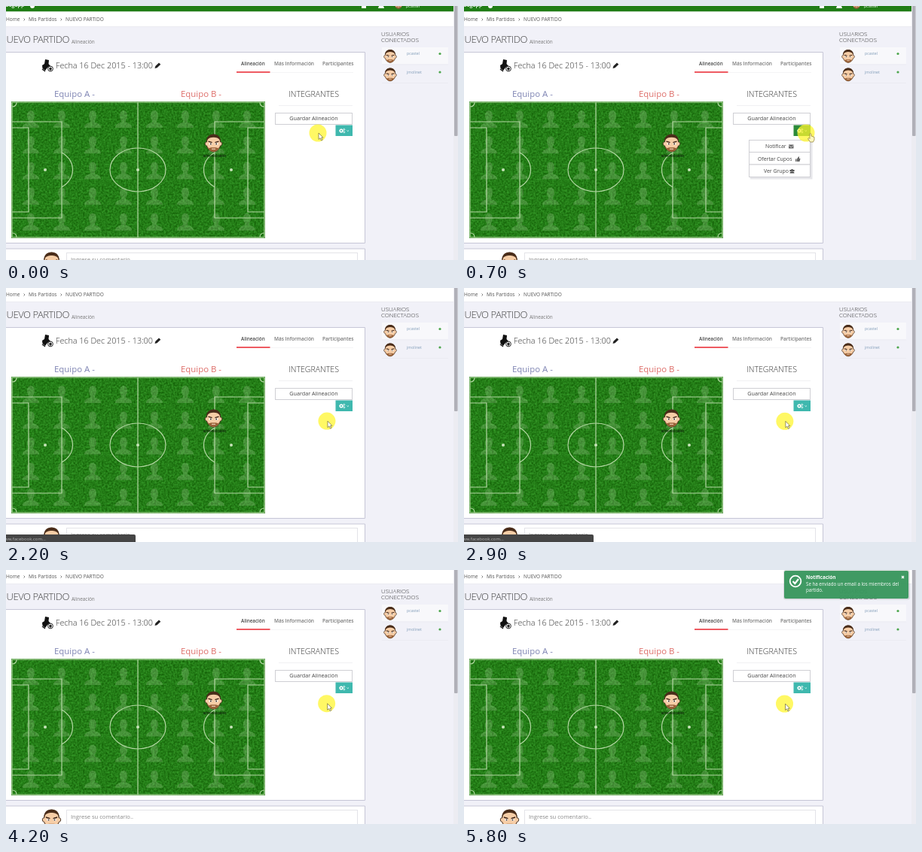
Recreate the animation shown at these times as an HTML page. Size 600 px wide and 338 px high, loop 5.9 s.

```html
<!DOCTYPE html>
<html lang="es">
<head>
<meta charset="utf-8">
<style>
  html, body { margin: 0; width: 100%; height: 100%; overflow: hidden; background: #f1f1f8; }
  svg { display: block; width: 600px; height: 338px; font-family: "Open Sans", sans-serif; }
  .light { font-weight: 300; }
  .semi { font-weight: 600; }
  .mid { text-anchor: middle; }
  .box { fill: #fff; stroke: #cfcfd4; }
  .lines { fill: none; stroke: #b4d8a4; stroke-width: 1.2; }
</style>
</head>
<body>
<svg viewBox="0 0 600 338">
  <defs>
    <filter id="grass" x="0" y="0" width="1" height="1" color-interpolation-filters="sRGB">
      <feTurbulence type="fractalNoise" baseFrequency=".4" numOctaves="2" seed="4"/>
      <feColorMatrix values=".2 0 0 0 .04  .34 0 0 0 .32  .2 0 0 0 -.01  0 0 0 0 1"/>
    </filter>
    <g id="face">
      <path d="M-9-1C-12-2-12 4-9 4C-8 9-3 12 0 12S8 9 9 4C12 4 12-2 9-1C9-14-9-14-9-1Z" fill="#f6cda6" stroke="#3a2518" stroke-width=".9"/>
      <path d="M-9 2C-8 9-3 12 0 12S8 9 9 2C8 7 6 8 3.500 6.300H-3.500C-6 8-8 7-9 2Z" fill="#9a6238"/>
      <path d="M-9.300-1C-11-15 11-15 9.300-1L8-4C6-8.500-6-8.500-8-4Z" fill="#4a2d1a"/>
      <path d="M-7-1.800L-2-.3M7-1.800L2-.3" stroke="#3a2014" stroke-width="1.400"/>
      <ellipse cx="-4" cy="1.500" rx="2" ry="1.300" fill="#fff"/>
      <ellipse cx="4" cy="1.500" rx="2" ry="1.300" fill="#fff"/>
      <circle cx="-3.700" cy="1.500" r=".9" fill="#2a1a10"/><circle cx="3.700" cy="1.500" r=".9" fill="#2a1a10"/>
      <path d="M-2.500 8.300H2.500" stroke="#f0d0b8" stroke-width="1.200"/>
    </g>
    <path id="fan" d="M-11 12C-11 7-7 6.500-3 4.500V2C-6-1-6-11 0-11S6-1 3 2V4.500C7 6.500 11 7 11 12Z"/>
    <g id="half" class="lines">
      <path d="M8 154H74V282H8M8 162H30V274H8M74 195A37 29 0 0 1 74 241M8 134Q14 134 14 128M8 302Q14 302 14 308"/>
      <circle cx="52" cy="218" r="1.500" fill="#d5ebcb"/>
    </g>
    <g id="gear" fill="none" stroke="#fff">
      <circle r="1.700" stroke-width="1.300"/>
      <circle r="2.500" stroke-width=".9" stroke-dasharray="1 .960"/>
    </g>
  </defs>

  <g id="page">
    <rect y="-10" width="600" height="370" fill="#f1f1f8"/>
    <rect y="-10" width="594" height="17.500" fill="#207d16"/>
    <g fill="#fff">
      <text x="-3" y="1" font-size="7" class="semi">Juegapp</text>
      <circle cx="35" r="3"/>
      <rect x="472" y="-2" width="6" height="5"/>
      <path d="M494 3L496-3H500L502 3Z"/>
      <text x="531" y="1.500" font-size="5.500">pcastel</text>
    </g>
    <use href="#face" transform="translate(521 -3) scale(.55)"/>

    <rect y="7.500" width="594" height="19.500" fill="#fff"/>
    <path d="M0 27.500H594" stroke="#ebebf1"/>
    <g font-size="6.500" fill="#555">
      <text y="20.300">Home</text><text x="30" y="20.300">Mis Partidos</text><text x="79" y="20.300">NUEVO PARTIDO</text>
      <path d="M23.500 16.500L25 18L23.500 19.500M72.500 16.500L74 18L72.500 19.500" fill="none" stroke="#666" stroke-width=".8"/>
    </g>
    <text x="84" y="49.300" font-size="13" letter-spacing="-.45" text-anchor="end" class="light" fill="#444">NUEVO PARTIDO</text>
    <text x="87" y="50" font-size="6.400" fill="#777">Alineación</text>

    <path d="M-2 61.500H476.500V315.500H-2Z" fill="#fff" stroke="#c6c6d6"/>
    <g transform="translate(47 71)">
      <path d="M5 0L10 1L9.500 6L12 9L8 11L5 15L1.500 12L1 8L4 6Z" fill="#111"/>
      <path d="M1 13L5 16" stroke="#111" stroke-width="1.200"/>
      <circle cx="12" cy="12.500" r="3.400" fill="#fff" stroke="#222"/>
      <path d="M12 10.500L14 12L13 14.500H11L10 12Z" fill="#222"/>
    </g>
    <text x="66" y="83" font-size="10.800" class="light" fill="#333">Fecha 16 Dec 2015 - 13:00</text>
    <path d="M197.500 83L198.300 80L203 75.500L205.300 77.800L200.500 82.300Z" fill="#222"/>
    <g font-size="6.500" class="semi" fill="#777">
      <text x="312" y="79" font-size="6.300" fill="#444">Alineación</text>
      <text x="356" y="79">Más Información</text><text x="420" y="79">Participantes</text>
    </g>
    <path d="M306 88H350.500" stroke="#ee5b62" stroke-width="2"/>
    <path d="M351 88.500H461" stroke="#f4f4f6"/>
    <text x="64" y="121" font-size="11.400" fill="#7d83b2">Equipo A -</text>
    <text x="232" y="121" font-size="11.400" fill="#dd6d68">Equipo B -</text>

    <rect x="7" y="127" width="337" height="182" fill="#23801f" filter="url(#grass)"/>
    <g id="crowd" fill="#d8f0c8" opacity=".2"></g>
    <g class="lines">
      <rect x="8" y="128" width="335" height="180"/>
      <path d="M175 128V308"/>
      <ellipse cx="175" cy="218" rx="37" ry="29"/>
      <circle cx="175" cy="218" r="1.500" fill="#d5ebcb"/>
    </g>
    <use href="#half"/>
    <use href="#half" transform="translate(351) scale(-1 1)"/>
    <use href="#face" transform="translate(275.500 182)"/>
    <text x="277" y="201.300" font-size="4.500" class="mid semi" fill="#10200c">administrador</text>

    <text x="408.500" y="121" font-size="10.600" class="light mid" fill="#333">INTEGRANTES</text>
    <path d="M362 132.500H460" stroke="#f0f0f3"/>
    <rect x="357.500" y="142.500" width="102" height="15" class="box"/>
    <text x="408.500" y="152.300" font-size="7.200" class="mid" fill="#444">Guardar Alineación</text>
    <rect id="button" x="437.500" y="158.500" width="22.500" height="14.500"/>
    <use href="#gear" x="445" y="166"/>
    <use href="#gear" transform="translate(448.800 164.300) scale(.5)"/>
    <use href="#gear" transform="translate(448.800 167.800) scale(.5)"/>
    <path d="M452.500 165.500L453.700 166.700L455 165.500" fill="none" stroke="#fff" stroke-width=".8"/>

    <g id="menu" font-size="6.900" fill="#444">
      <rect x="380" y="180" width="82.500" height="50.500" fill="#e6e6ea"/>
      <g class="box">
        <rect id="notify" x="378.500" y="178.500" width="81" height="16"/>
        <rect x="378.500" y="194.500" width="81" height="16.500"/>
        <rect x="378.500" y="211" width="81" height="16.500"/>
      </g>
      <text x="400" y="189">Notificar</text><text x="390" y="205.500">Ofertar Cupos</text><text x="398" y="222.300">Ver Grupo</text>
      <g fill="#666">
        <rect x="431" y="184.500" width="6.500" height="5"/>
        <path d="M431 185.500L434.200 188L437.500 185.500" fill="none" stroke="#fff" stroke-width=".7"/>
        <path d="M440 203.500H441.500V207H440ZM442 203.500L444 200.500H445V203H446.500L445.500 207H442Z"/>
      </g>
      <path d="M432.500 222.500Q432.500 220.300 435.500 220.300T438.500 222.500ZM432.500 220V218H434V220ZM437 220V218H438.500V220Z"/>
      <circle cx="435.500" cy="218.500" r="1.500"/>
    </g>

    <g class="light" font-size="7.900" fill="#333">
      <text x="498" y="39.500">USUARIOS</text><text x="498" y="47.700">CONECTADOS</text>
    </g>
    <rect x="499" y="55" width="88" height="22.500" fill="#f8f8fb"/>
    <path d="M499 78H587M499 102.500H587" stroke="#ebebf2"/>
    <g font-size="5.200" fill="#7f9cb8">
      <text x="532" y="65">pcastel</text><text x="532" y="89.500">jmolinet</text>
    </g>
    <circle cx="576" cy="63.500" r="1.600" fill="#4ca64c"/>
    <circle cx="576" cy="88" r="1.600" fill="#4ca64c"/>
    <use href="#face" transform="translate(510 66.500) scale(.74)"/>
    <use href="#face" transform="translate(510 91) scale(.74)"/>

    <path d="M-2 323H476.500V360H-2Z" fill="#fff" stroke="#c6c6d6"/>
    <rect x="80.500" y="328.500" width="386" height="30" fill="#fff" stroke="#e3e3e8"/>
    <use href="#face" transform="translate(60.500 340) scale(1.080)"/>
    <text x="86" y="339.500" font-size="7.600" fill="#888">Ingrese su comentario..</text>

    <rect x="594" y="-10" width="6" height="370" fill="#ececf2"/>
    <rect x="595" y="-10" width="4.500" height="183" rx="1" fill="#b0b0b8"/>
  </g>

  <g id="status">
    <path d="M0 328H170Q172 328 172 330V338H0Z" fill="#454545"/>
    <text x="-2" y="335.500" font-size="6" fill="#b5b5b5">ww.facebook.com...</text>
  </g>

  <g id="toast" fill="#fff">
    <rect x="424" y="0" width="168" height="39.500" rx="3" fill="#000" opacity=".12"/>
    <rect x="425" y="1" width="165" height="37" rx="2" fill="#35955a"/>
    <circle cx="440" cy="15" r="7.300" fill="none" stroke="#fff" stroke-width="1.800"/>
    <path d="M436.500 15L439.300 18L444 12" fill="none" stroke="#fff" stroke-width="2.200"/>
    <text x="454" y="11.500" font-size="6.500" font-weight="700">Notificación</text>
    <g font-size="6.200"><text x="454" y="20.500">Se ha enviado un email a los miembros del</text><text x="454" y="29">partido.</text></g>
    <path d="M581 8L584 11M584 8L581 11" stroke="#fff" stroke-width="1.200"/>
  </g>

  <g id="pointer">
    <circle r="11.500" fill="#fff52e" opacity=".74"/>
    <path id="arrow" d="M1 0V8.500L3 6.700L4.500 10L6 9.300L4.500 6.200H7Z" fill="#fff" stroke="#6e6630" stroke-width=".7"/>
    <path id="hand" d="M5 1Q6.500 0 7 1.500V4L11 5.500V9L9.500 12H5.500L2.500 7.500L4 6.500L5 7.500Z" fill="#fff8c0" stroke="#8a7a30" stroke-width=".7"/>
  </g>
</svg>
<script>
const $ = id => document.getElementById(id);
const LOOP = 5900, STEP = 100;

// Empty player slots on the pitch
let slots = '';
for (let i = 0; i < 40; i++)
  slots += `<use href="#fan" x="${33 + i % 8 * 41}" y="${150 + Math.floor(i / 8) * 34.2}"/>`;
$('crowd').innerHTML = slots;

const clamp = x => Math.max(0, Math.min(1, x));
const swing = x => (1 - Math.cos(Math.PI * clamp(x))) / 2;
const show = (id, on) => $(id).setAttribute('visibility', on ? 'visible' : 'hidden');
const move = (id, x, y) => $(id).setAttribute('transform', `translate(${x} ${y})`);

// Pointer stops: time, x, y
const path = [[0, 414, 169], [400, 454, 169], [700, 454, 169], [1200, 426, 177], [LOOP, 425.5, 178]];

function pointerAt(t) {
  const i = path.findIndex(p => p[0] > t);
  const [t0, x0, y0] = path[i - 1], [t1, x1, y1] = path[i];
  const k = swing((t - t0) / (t1 - t0));
  return [x0 + (x1 - x0) * k, y0 + (y1 - y0) * k];
}

function draw(t) {
  const open = t >= 400 && t < 1700;
  const overButton = t >= 300 && t < 900;
  move('page', 0, -9 * clamp((t - 700) / 400));
  move('pointer', ...pointerAt(t));
  show('hand', overButton);
  show('arrow', !overButton);
  show('menu', open);
  $('notify').style.fill = t >= 1100 ? '#dedee0' : '#fff';
  $('button').style.fill = overButton ? '#2c8a3a' : open ? '#2f9a8e' : '#3fb8ae';
  show('status', t >= 2000 && t < 3400);
  $('toast').style.opacity = swing((t - 4950) / 1000);
}

function tick(now) {
  draw(Math.floor(now % LOOP / STEP) * STEP);
  requestAnimationFrame(tick);
}
draw(0);
requestAnimationFrame(tick);
</script>
</body>
</html>
```
